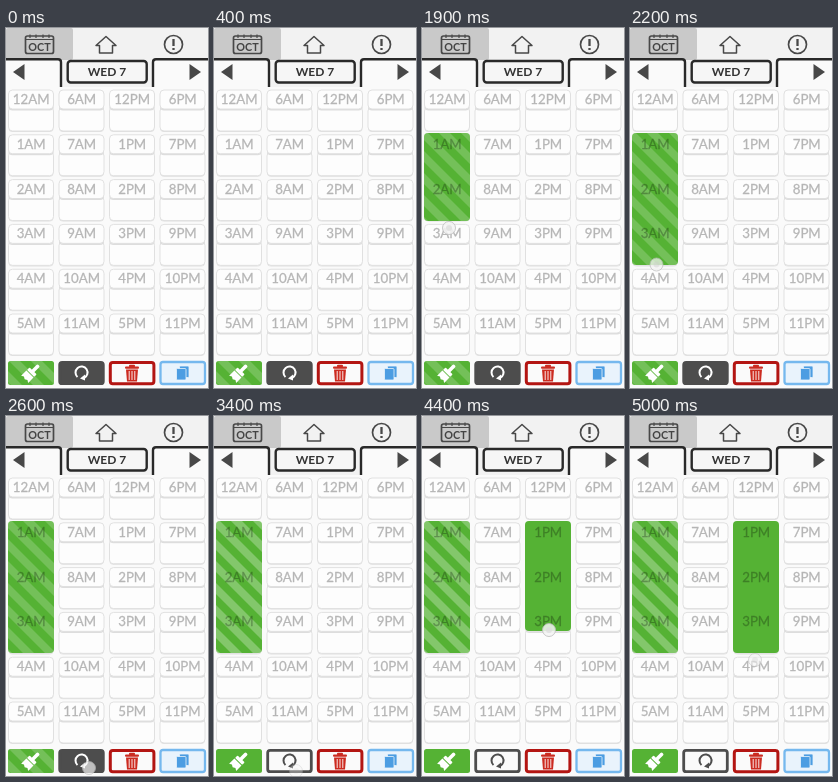
Animation of 202x360 px, one loop 5.1 s. Source, as an HTML page:

```html
<!DOCTYPE html>
<html lang="en">
<head>
<meta charset="utf-8">
<title>Day planner</title>
<style>
  html, body { margin: 0; width: 100%; height: 100%; overflow: hidden; background: #fafafa; }
  svg { display: block; width: 100%; height: 100%; }
  text { font-family: Lato, sans-serif; text-anchor: middle; }
  .hour { font-size: 13.3px; fill: #000; stroke: #000; stroke-width: .3; opacity: .28; }
  .line { fill: none; stroke: #484848; stroke-width: 1.7; stroke-linejoin: round; }
</style>
</head>
<body>
<svg viewBox="0 0 202 360" preserveAspectRatio="none">
  <defs>
    <pattern id="stripes" width="22" height="22" patternUnits="userSpaceOnUse" patternTransform="translate(0 11)">
      <path d="M0 0L22 22V33L0 11ZM0 -22L22 0V11L0 -11Z" fill="#fff"/>
    </pattern>
  </defs>
  <rect width="202" height="360" fill="#fafafa"/>

  <!-- Header -->
  <rect width="202" height="60" fill="#f2f2f2"/>
  <rect width="67" height="32" rx="2" fill="#c9c9c9"/>
  <g class="line">
    <rect x="19.500" y="8" width="28" height="17.500" rx="2"/>
    <path d="M20 11.500H47M24 6.500V10M30 6.500V10M37 6.500V10M43 6.500V10" stroke-width="1.2"/>
    <path d="M90 17.500L100 8.500L110 17.500H106.500V25H93.500V17.500Z" stroke-width="1.5"/>
    <circle cx="167.500" cy="16.500" r="9"/>
    <path d="M167.500 11V18M167.500 20V22" stroke-width="2.300"/>
  </g>
  <text x="33.500" y="22.700" font-size="10.800" font-weight="700" fill="#444">OCT</text>
  <g fill="#fafafa" stroke="#292929" stroke-width="2.400">
    <path d="M-2 31.200H52Q55 31.200 55 34.200V62H-2Z"/>
    <path d="M204 31.200H150Q147 31.200 147 34.200V62H204Z"/>
    <rect x="61.700" y="33" width="79" height="21.500" rx="3" fill="#f6f6f6"/>
  </g>
  <path d="M7 44L18.500 36V52ZM195 44L183.500 36V52Z" fill="#484848"/>
  <text x="101" y="47.700" font-size="12" font-weight="700" fill="#333">WED 7</text>
  <rect y="59" width="202" height="301" fill="#fafafa"/>

  <g id="cells"></g>
  <rect class="range" x="2" y="105" width="46" rx="4" fill="#55b234"/>
  <rect class="range" id="rangeStripes" x="2" y="105" width="46" rx="4" fill="url(#stripes)"/>
  <rect id="secondRange" x="103" y="105" width="46" rx="4" fill="#55b234"/>
  <g id="labels"></g>

  <!-- Toolbar -->
  <rect x="2" y="333" width="46" height="24" rx="2.500" fill="#55b234"/>
  <rect id="buttonStripes" x="2" y="333" width="46" height="24" rx="2.500" fill="url(#stripes)" opacity=".18"/>
  <g transform="translate(25 345) rotate(45)" fill="#fff">
    <rect x="-1.800" y="-11" width="3.600" height="9" rx="1.500"/>
    <rect x="-5" y="-3" width="10" height="3.500" rx=".8"/>
    <path d="M-5 1.500H5V9L2.500 7.500L0 9L-2.500 7.500L-5 9Z"/>
  </g>
  <rect id="repeatButton" x="53.700" y="334.300" width="43.600" height="21.400" rx="2.500" stroke="#4d4d4d" stroke-width="2.800"/>
  <g id="repeatIcon">
    <path d="M71.500 349A6 6 0 1 1 78 350" fill="none" stroke="currentColor" stroke-width="2"/>
    <path d="M74 350.500L79 346.500V352.500Z" fill="currentColor"/>
  </g>
  <rect x="104.300" y="334.500" width="43.600" height="21.200" rx="2.500" fill="#fafafa" stroke="#b31512" stroke-width="3"/>
  <g fill="#cc2b20">
    <rect x="119" y="338.500" width="14" height="2.200" rx="1"/>
    <rect x="123" y="336.700" width="6" height="2.500" rx="1"/>
    <path d="M120 341.500H132L131 353.500H121Z"/>
  </g>
  <path d="M123.200 343V352M126 343V352M128.800 343V352" stroke="#fff" stroke-width=".9"/>
  <rect x="154.500" y="334" width="44.500" height="22" rx="2.500" fill="#e9f3fc" stroke="#75b8ee" stroke-width="2.300"/>
  <g fill="#4c9de2" stroke="#e9f3fc" stroke-width=".8">
    <rect x="173.500" y="338" width="9.500" height="11.500" rx="1"/>
    <rect x="170.500" y="340.500" width="9.500" height="11.500" rx="1"/>
  </g>

  <g id="cursor">
    <circle r="6.500" fill="#f4f4f4" fill-opacity=".85" stroke="#bbb" stroke-width=".8"/>
    <circle r="3" fill="#ddd" fill-opacity=".8"/>
  </g>
</svg>
<script>
const LOOP = 5100, STEP = 100;
const RANGE_TOP = 105.5, HALF_HOUR = 22;
const get = id => document.getElementById(id);

function buildGrid() {
  let cells = '', labels = '';
  for (let hour = 0; hour < 24; hour++) {
    const x = 2.5 + Math.floor(hour / 6) * 50.5;
    const y = 62 + (hour % 6) * 44.8;
    cells += `<g transform="translate(${x} ${y})" fill="#fdfdfd" stroke="#dedede">
      <rect y="1" width="45" height="41" rx="4" fill="#e2e2e2" stroke="none"/>
      <rect y="17" width="45" height="24" rx="4" stroke-width=".9"/>
      <rect y="1" width="45" height="19.500" rx="4" fill="#ddd" stroke="none"/>
      <rect width="45" height="19" rx="4" stroke-width=".9"/></g>`;
    labels += `<text class="hour" x="${x + 22.7}" y="${y + 14}">${hour % 12 || 12}${hour < 12 ? 'AM' : 'PM'}</text>`;
  }
  get('cells').innerHTML = cells;
  get('labels').innerHTML = labels;
}

// Cursor strokes: [time, x, y, opacity]
const strokes = [
  [[1500, 18, 127, .7], [1600, 20, 135, .9], [1700, 22, 152, 1], [1900, 27, 200, 1],
   [2000, 27, 218, 1], [2100, 27, 231, 1], [2300, 26, 242, .7], [2400, 26, 243, .3]],
  [[2500, 83, 350, .4], [2600, 83, 352, .8], [3200, 83, 353, .8], [3400, 82, 355, .4], [3600, 82, 356, 0]],
  [[4000, 120, 124, .6], [4100, 122, 140, 1], [4400, 127, 214, 1],
   [4500, 127, 228, 1], [4600, 126, 236, 1], [4800, 125, 243, .9], [5000, 125, 244, .7]]
];

function sample(stroke, t) {
  if (t <= stroke[0][0]) return stroke[0];
  const next = stroke.findIndex(key => key[0] >= t);
  if (next < 0) return stroke.at(-1);
  const a = stroke[next - 1], b = stroke[next];
  const k = (t - a[0]) / (b[0] - a[0]);
  return a.map((v, i) => v + (b[i] - v) * k);
}

// A range grows in half-hour steps under the cursor.
function rangeHeight(stroke, t) {
  if (t <= stroke[0][0]) return 0;
  const halves = Math.round((sample(stroke, t)[2] - RANGE_TOP) / HALF_HOUR);
  return Math.max(0, Math.min(6, halves)) * HALF_HOUR;
}

function draw(t) {
  const repeatOff = t >= 3100;
  document.querySelectorAll('.range').forEach(r => r.setAttribute('height', rangeHeight(strokes[0], t)));
  get('secondRange').setAttribute('height', rangeHeight(strokes[2], t));
  get('rangeStripes').setAttribute('opacity', repeatOff ? .27 : .18);
  get('buttonStripes').style.display = repeatOff ? 'none' : '';
  get('repeatButton').setAttribute('fill', repeatOff ? '#fafafa' : '#4d4d4d');
  get('repeatIcon').style.color = repeatOff ? '#4d4d4d' : '#fff';

  const active = strokes.find(s => t >= s[0][0] && t <= s.at(-1)[0]);
  const [, x, y, opacity] = active ? sample(active, t) : [0, 0, 0, 0];
  get('cursor').setAttribute('transform', `translate(${x} ${y})`);
  get('cursor').setAttribute('opacity', opacity);
}

buildGrid();
const start = performance.now();
function frame() {
  const t = (performance.now() - start) % LOOP;
  draw(Math.floor(t / STEP) * STEP);
  requestAnimationFrame(frame);
}
frame();
</script>
</body>
</html>
```
